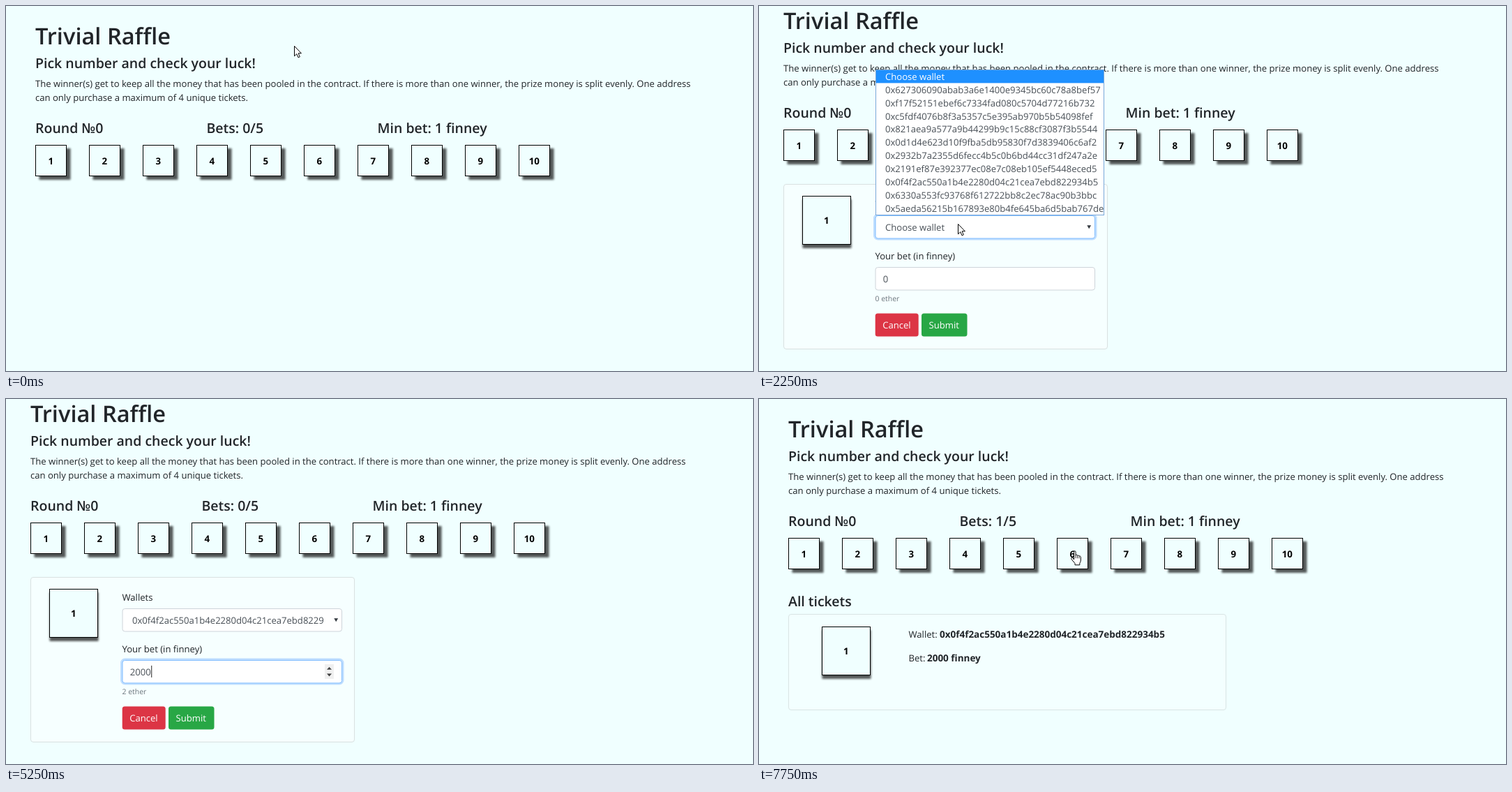
Write an HTML page that moves like this. It is 1071 px wide and 523 px high and loops after 8000 ms.

```html
<!DOCTYPE html>
<html lang="en">
<head>
<meta charset="utf-8">
<title>Raffle demo</title>
<style>
  html, body { margin: 0; width: 100%; height: 100%; overflow: hidden; background: #f0ffff; }
  svg { display: block; width: 1071px; height: 523px; }
  text { font-family: "Open Sans", "Noto Sans", sans-serif; font-size: 13.08px; fill: #212529; text-rendering: geometricPrecision; white-space: pre; }
  .h1 { font-size: 32.6px; font-weight: 600; }
  .h4 { font-size: 19.5px; font-weight: 600; }
  .num { font-size: 13.3px; font-weight: 700; fill: #000; text-anchor: middle; }
  .bold { font-size: 13.5px; font-weight: 700; }
  .small { font-size: 10.45px; fill: #6c757d; }
  .field { fill: #495057; }
  .light { fill: #fff; }
</style>
</head>
<body>
<svg viewBox="0 0 1071 523">
  <defs>
    <filter id="blur" x="-20%" y="-20%" width="140%" height="140%"><feGaussianBlur stdDeviation="1.5"/></filter>
    <clipPath id="selectClip"><rect x="168" y="320" width="288" height="40"/></clipPath>
  </defs>
  <g id="stage"></g>
</svg>
<script>
const LOOP = 8000, STEP = 250;
const stage = document.getElementById('stage');

const wallets = [
  '0x627306090abab3a6e1400e9345bc60c78a8bef57',
  '0xf17f52151ebef6c7334fad080c5704d77216b732',
  '0xc5fdf4076b8f3a5357c5e395ab970b5b54098fef',
  '0x821aea9a577a9b44299b9c15c88cf3087f3b5544',
  '0x0d1d4e623d10f9fba5db95830f7d3839406c6af2',
  '0x2932b7a2355d6fecc4b5c0b6bd44cc31df247a2e',
  '0x2191ef87e392377ec08e7c08eb105ef5448eced5',
  '0x0f4f2ac550a1b4e2280d04c21cea7ebd822934b5',
  '0x6330a553fc93768f612722bb8c2ec78ac90b3bbc',
  '0x5aeda56215b167893e80b4fe645ba6d5bab767de'
];
const chosen = wallets[7];

// time, x, y
const path = [
  [0, 413, 57], [500, 180, 175], [750, 64, 218], [1000, 66, 220],
  [1250, 108, 220], [1500, 205, 285], [1750, 270, 316], [2000, 285, 312],
  [2250, 285, 312], [2500, 287, 288], [2750, 290, 250], [3000, 290, 250],
  [3250, 184, 383], [5500, 262, 444], [5750, 264, 454], [6000, 292, 456],
  [6250, 294, 456], [7000, 294, 456], [7500, 428, 262], [7750, 447, 217]
];

const between = (t, a, b) => t >= a && t < b;

const text = (x, y, str, cls = '') => `<text x="${x}" y="${y}" class="${cls}">${str}</text>`;

const box = (x, y, w, h, fill, stroke = 'none', r = 0, line = 1) =>
  `<rect x="${x}" y="${y}" width="${w}" height="${h}" rx="${r}" fill="${fill}" stroke="${stroke}" stroke-width="${line}"/>`;

const shape = (d, fill = '#212529', extra = '') => `<path d="${d}" fill="${fill}" ${extra}/>`;

const move = (x, y, inner) => `<g transform="translate(${x} ${y})">${inner}</g>`;

function tile(x, y, size, n, dx) {
  const side = size + 1;
  return `<rect x="${x + dx}" y="${y + 5}" width="${side}" height="${side}" fill="#000" opacity=".66" filter="url(#blur)"/>` +
    box(x + .5, y + .5, size, size, '#f0ffff', '#000') +
    text(x + size / 2 + .3, y + size / 2 + 5.7, n, 'num');
}

function input(y, focused) {
  const ring = focused ? box(165.5, y - 1, 317.5, 35, 'none', '#bfdeff', 5, 3) : '';
  return ring + box(167, y + .5, 314.5, 32.5, '#fff', focused ? '#80bdff' : '#ced4da', 3.5);
}

function header(bets) {
  let out = text(42, 55, 'Trivial Raffle', 'h1') +
    text(42, 89, 'Pick number and check your luck!', 'h4') +
    text(42, 115.5, 'The winner(s) get to keep all the money that has been pooled in the contract. If there is more than one winner, the prize money is split evenly. One address') +
    text(42, 136, 'can only purchase a maximum of 4 unique tickets.') +
    text(42, 182, 'Round №0', 'h4') +
    text(287.5, 182, `Bets: ${bets}/5`, 'h4') +
    text(532.5, 182, 'Min bet: 1 finney', 'h4');
  for (let i = 0; i < 10; i++) out += tile(42 + 77 * i, 199, 44, i + 1, 5.5);
  return out;
}

function betField(t) {
  const focused = t >= 3250;
  const typed = '2000'.slice(0, Math.max(0, Math.floor((t - 4000) / STEP) + 1));
  const value = typed || '0';
  const selected = between(t, 3500, 4000);
  let out = input(396, focused);
  if (selected) out += box(178, 403, 7.5, 18, '#3390ff');
  out += text(177.8, 417.8, value, selected ? 'light' : 'field');
  if (focused) {
    out += box(457, 402, 13, 21, '#f0f0f0') +
      shape('M460 409.8l3.5-3.8 3.5 3.8zM460 415.6l3.5 3.8 3.5-3.8z', '#404040');
  }
  if (typed) out += box(178.4 + 7.46 * typed.length, 404, 1, 17, '#222');
  return out + text(166.5, 445.3, `${Number(value) / 1000} ether`, 'small');
}

function form(t) {
  const picked = t >= 3000;
  const select = text(181, 343.8, picked ? chosen : 'Choose wallet', 'field');
  return box(35.5, 277.5, 464, 236, '#f6ffff', '#d9e0e0', 3.5) +
    tile(62, 294, 69, 1, .5) +
    text(166.5, 310.5, 'Wallets') +
    input(322, between(t, 1750, 3250)) +
    `<g clip-path="url(#selectClip)">${select}</g>` +
    shape('M470.3 336.3h5.8l-2.9 5z', '#343a40') +
    text(166.5, 384.5, 'Your bet (in finney)') +
    betField(t) +
    box(166.7, 462.5, 62, 33, '#dc3545', 'none', 3.5) + text(177.2, 484, 'Cancel', 'light') +
    box(233, 462.5, 65.5, 33, '#28a745', 'none', 3.5) + text(243.5, 484, 'Submit', 'light');
}

function dropdown(t) {
  const active = t < 2500 ? 0 : t < 2750 ? 10 : 8;
  const row = 18.92;
  let out = box(167.5, 91.5, 327, 208, '#fff', '#7aa7d9');
  out += box(168, 92 + row * active, 326, 18.4, '#1e90ff');
  ['Choose wallet', ...wallets].forEach((w, i) => {
    out += text(181, 105.8 + row * i, w, i === active ? 'light' : 'field');
  });
  return out;
}

function tickets() {
  return text(42, 297, 'All tickets', 'h4') +
    box(42.5, 308.5, 627, 137, '#f3ffff', '#d9e4e4', 3.5) +
    tile(90, 326, 69, 1, .5) +
    text(214.5, 341.5, 'Wallet:') + text(259, 341.5, chosen, 'bold') +
    text(214.5, 375.5, 'Bet:') + text(241, 375.5, '2000 finney', 'bold');
}

const arrow = shape('M.5.5V14.8L3.8 11.7L6 16.8L8.3 15.8L6.1 10.8H10.4Z', '#fff', 'stroke="#000"');
const hand = shape('M4.6 13V2.4Q4.6.8 5.8.8T7.1 2.4V7.2Q7.2 6.2 8.4 6.3T9.6 7.6Q9.9 6.9 10.9 7.1T12 8.4Q12.3 7.8 13.2 8T14.3 9.6V14Q14.2 16.4 12.8 18.3V20.8H6V18.5L1.2 12.8Q.2 11.2 1.4 10.4T4.6 13Z', '#fff', 'stroke="#000"') +
  shape('M7.1 7.2v4M9.6 8v3.3M12 8.8v2.6', 'none', 'stroke="#000" stroke-width=".8"');
const beam = shape('M-2.5.5H2.5M0 .5V15M-2.5 15H2.5', 'none', 'stroke="#000"');

function pointer(t) {
  if (between(t, 3500, 5500)) return '';
  let i = path.findIndex(p => p[0] > t);
  if (i < 0) i = path.length;
  const a = path[i - 1], b = path[i] || a;
  const k = b === a ? 0 : (t - a[0]) / (b[0] - a[0]);
  const onButton = between(t, 750, 1250) || between(t, 5500, 6000) || t >= 7750;
  const icon = onButton ? hand : between(t, 3250, 3500) ? beam : arrow;
  return move(a[1] + (b[1] - a[1]) * k, a[2] + (b[2] - a[2]) * k, icon);
}

function render(t) {
  const open = between(t, 1000, 6000);
  const scroll = open && t >= 1750 ? -22 : 0;
  let out = move(open ? -7 : 0, scroll, header(t >= 6500 ? 1 : 0));
  if (open) out += move(0, scroll, form(t));
  if (between(t, 2000, 3000)) out += dropdown(t);
  if (t >= 7000) out += tickets();
  stage.innerHTML = out + pointer(t);
}

const start = performance.now();
let last = -1;
function tick() {
  const t = Math.floor(((performance.now() - start) % LOOP) / STEP) * STEP;
  if (t !== last) render(last = t);
  requestAnimationFrame(tick);
}
tick();
</script>
</body>
</html>
```
